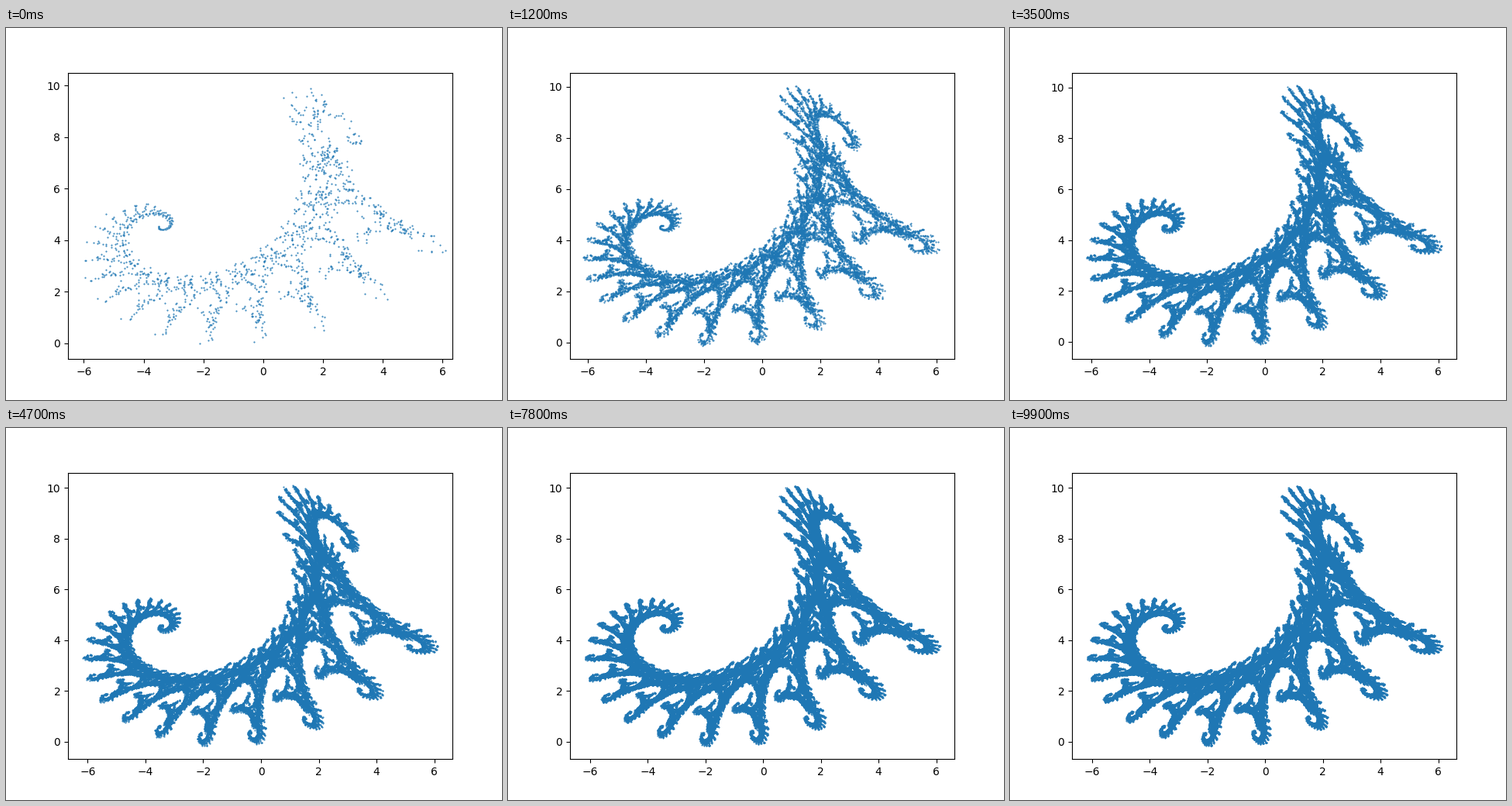
Recreate the animation shown at these times as a matplotlib script. Size 640 by 480 pixels, loop 10 s.

```python
import random

import matplotlib.pyplot as plt
import numpy as np
from matplotlib.animation import FuncAnimation

FRAMES = 100
STEP = 1500  # points added per frame
BURN_IN = 30

# Affine maps (a, b, c, d, e, f): x' = ax + by + e, y' = cx + dy + f
MAIN = (0.824074, 0.281482, -0.212346, 0.864198, -1.882290, -0.110607)
SIDE = (0.088272, 0.520988, -0.463889, -0.377778, 0.785360, 8.095795)
P_MAIN = 0.8

# Axis limits (left, right, bottom, top) widen from FIRST towards LAST
FIRST = np.array([-6.53, 6.325, -0.61, 10.50])
LAST = np.array([-6.70, 6.63, -0.69, 10.60])
SETTLE = np.array([20, 4, 18, 18])  # time constants in frames


def chaos_game(count, seed=7):
    rng = random.Random(seed)
    x = y = 0.0
    points = []
    for _ in range(count + BURN_IN):
        a, b, c, d, e, f = MAIN if rng.random() < P_MAIN else SIDE
        x, y = a * x + b * y + e, c * x + d * y + f
        points.append((x, y))
    return np.array(points[BURN_IN:])


points = chaos_game(FRAMES * STEP)

fig, ax = plt.subplots(figsize=(6.4, 4.8), dpi=100)
dots, = ax.plot([], [], ".", color="#1f77b4", markersize=1)


def update(frame):
    dots.set_data(*points[:(frame + 1) * STEP].T)
    ax.axis(LAST + (FIRST - LAST) * np.exp(-frame / SETTLE))
    return dots,


anim = FuncAnimation(fig, update, frames=FRAMES, interval=100,
                     repeat=True, repeat_delay=0, blit=False)
plt.show()
```
